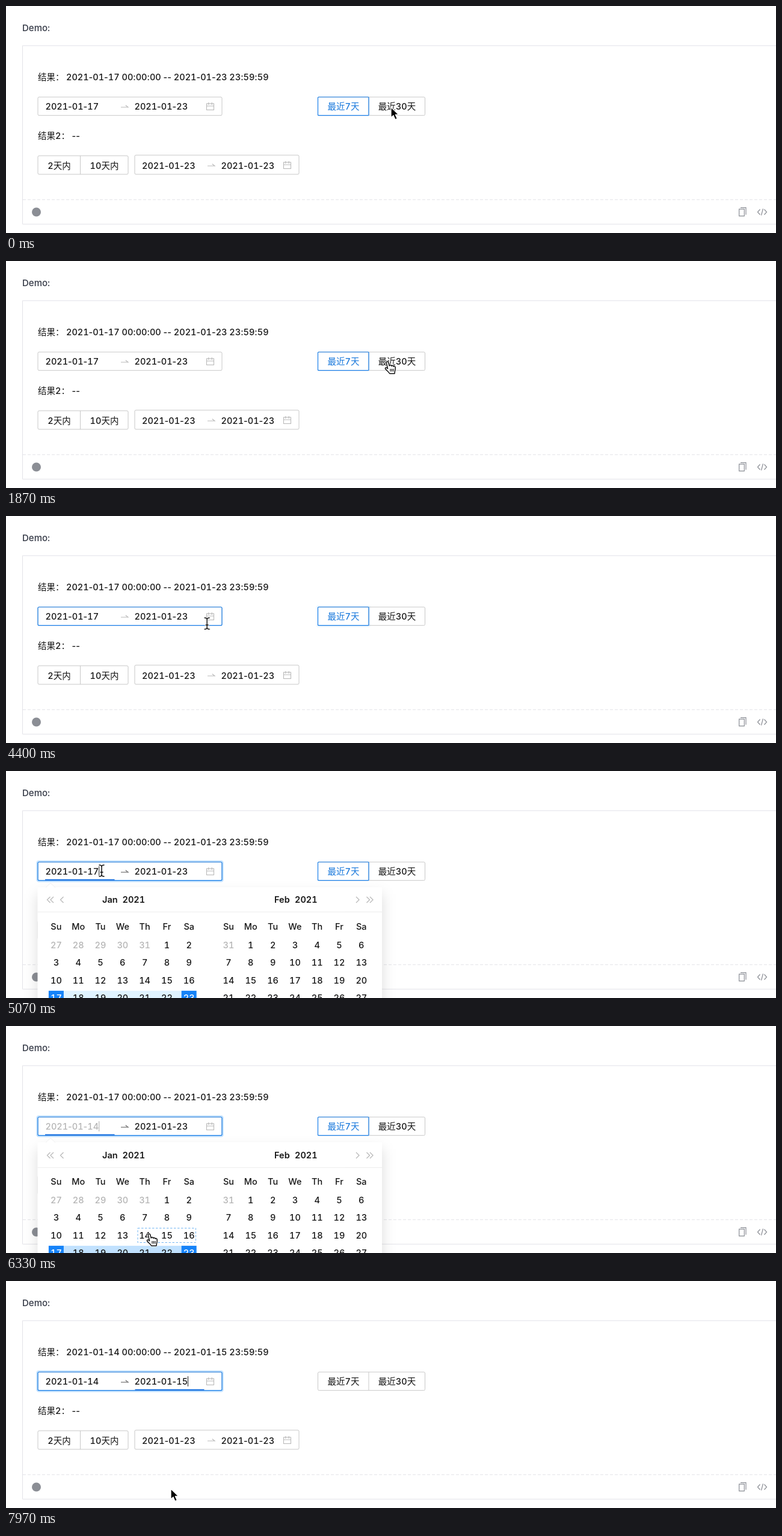
Recreate the animation shown at these times as an HTML page. Size 1280 px wide and 379 px high, loop 8000 ms.

```html
<!DOCTYPE html>
<html lang="zh-CN">
<head>
<meta charset="utf-8">
<title>Date range demo</title>
<style>
html, body { margin: 0; width: 100%; height: 100%; overflow: hidden; background: #fff; }
svg { display: block; width: 100vw; height: 100vh; }
text { font: 450 14.5px Inter, "Noto Sans CJK SC", sans-serif; font-feature-settings: "tnum"; fill: #161616; }
.sep { font-feature-settings: normal; }
.mid text, text.mid { text-anchor: middle; }
.dim, .dim text { fill: #b5b5b5; }
.bold { font-weight: 600; }
.title { font-size: 15px; fill: #343946; }
.box { fill: #fff; stroke: #c8c8c8; }
.line { fill: none; stroke: #e3e3e8; }
.icon { fill: none; stroke: #b9b9b9; stroke-width: 1.1; }
.tool { fill: none; stroke: #8b8e95; stroke-width: 1.2; }
.pick { fill: none; stroke: #1a80ea; stroke-width: 1.2; }
.glow { fill: none; stroke: #1890ff; stroke-opacity: .06; stroke-width: 3; }
.full { fill: #1683f8; }
.light { fill: #e0f3ff; }
.dark { fill: #c1e1fe; }
.off { fill: #f3f3f3; }
.bar { fill: #1f74e0; }

.cur { animation: move 8s linear infinite; }
.drop { transform-origin: 0 194px; animation: drop 8s linear infinite; }
.head { animation: head 8s step-end infinite; }
.week { animation: week 8s linear infinite; }
.month { animation: month 8s linear infinite; }
.past { animation: past 8s step-end infinite; }
.d14 { animation: d14 8s step-end infinite; }
.d15 { animation: d15 8s step-end infinite; }
.d17 { animation: d17 8s step-end infinite; }
.d23 { fill: #fff; }

@keyframes move {
  0%, .3% { transform: translate(640px, 169px); animation-timing-function: ease-in-out; }
  2.9%, 5.3% { transform: translate(509px, 184px); animation-timing-function: ease-in-out; }
  10.4%, 12.1% { transform: translate(619px, 168px); animation-timing-function: ease-in-out; }
  17.1%, 23.5% { transform: translate(634px, 168px); animation-timing-function: ease-in-out; }
  27.9%, 33.5% { transform: translate(646px, 171px); animation-timing-function: ease-in-out; }
  39.6%, 50.3% { transform: translate(561px, 166px); animation-timing-function: ease-in; }
  52.2% { transform: translate(515px, 180px); }
  53.6% { transform: translate(425px, 187px); }
  55% { transform: translate(335px, 180px); animation-timing-function: ease-out; }
  59.6%, 71.2% { transform: translate(159px, 167px); animation-timing-function: ease-in-out; }
  76.6%, 78.3% { transform: translate(240px, 372px); }
  79.1%, 85.5% { transform: translate(238px, 347px); animation-timing-function: ease-in-out; }
  89.6%, 100% { transform: translate(274px, 347px); }
}
@keyframes drop {
  0%, 60.9% { opacity: 0; transform: scaleY(.8); animation-timing-function: cubic-bezier(.23, 1, .32, 1); }
  63.3%, 93.5% { opacity: 1; transform: none; animation-timing-function: cubic-bezier(.755, .05, .855, .06); }
  95.9%, 100% { opacity: 0; transform: scaleY(.8); }
}
@keyframes head { 0% { transform: translateY(-1px); } 64%, 100% { transform: none; } }
@keyframes week {
  0%, 30% { fill: #1878dc; } 33.7%, 37.5% { fill: #161616; }
  41%, 84.3% { fill: #1878dc; } 88%, 100% { fill: #161616; }
}
@keyframes month {
  0%, 23.5% { fill: #161616; } 27.5%, 42.7% { fill: #1878dc; } 46.5%, 100% { fill: #161616; }
}
@keyframes past { 0% { fill: #161616; } 84.4%, 100% { fill: #b0b0b0; } }
@keyframes d14 { 0% { fill: #161616; } 84.4%, 100% { fill: #fff; } }
@keyframes d15 { 0% { fill: #161616; } 92.9%, 100% { fill: #fff; } }
@keyframes d17 { 0% { fill: #fff; } 84.4%, 100% { fill: #161616; } }
</style>
</head>
<body>
<svg viewBox="0 0 1280 379">
  <defs>
    <filter id="soft" x="-20%" y="-20%" width="140%" height="140%"><feGaussianBlur stdDeviation="11"/></filter>
    <g id="cal"><rect x=".5" y="2" width="12" height="10.5"/><path d="M.5 6H12.5M3.8 0V4M9.2 0V4"/></g>
    <path id="to" d="M0 0H12L7.8-3.3"/>
    <path id="beam" d="M-4-10Q0-10 0-7Q0-10 4-10M0-7V6M-4 9Q0 9 0 6Q0 9 4 9M-2 2H2"/>
    <path id="hand" d="M-1.8 1.5C-1.8-.6 1.4-.6 1.8 1.5L3.2 7C3.6 5.4 6.4 5.2 6.8 7.4C7.4 6 9.6 6.2 10 8.2C11 7 13 7.6 13.2 9.6C13.4 12.5 13.4 14 12.4 16.500L12 20H3.800C2.600 17.500 .2 15.800-2.800 12.900C-4.600 11-3 9.200-1 10.400L.6 11.800Z"/>
  </defs>

  <text class="title" x="27" y="42">Demo:</text>
  <path class="line" d="M1280 66.2H27.5V364.2H1280"/>
  <path class="line" d="M28 323.3H1280" stroke-dasharray="5 3"/>
  <circle cx="50.5" cy="344" r="7.5" fill="#8b8e95"/>
  <g class="tool">
    <path d="M1218.7 339.2H1227.3V350.7H1218.7ZM1221 336.7H1230V348.5"/>
    <path d="M1253.5 339.5L1249.5 344L1253.5 348.5M1260.5 339.5L1264.5 344L1260.5 348.5M1258.5 338.5L1255.5 349.5"/>
  </g>

  <text x="53" y="124">结果：</text>
  <g id="result"></g>

  <rect class="box" x="53" y="152" width="306" height="30.7" rx="2"/>
  <rect class="pick" x="53" y="152" width="306" height="30.7" rx="2" data-on="4390 4880"/>
  <g data-on="4880 8000">
    <rect x="51.5" y="150.5" width="309" height="33.7" rx="3" fill="none" stroke="#1890ff" stroke-opacity=".25" stroke-width="2.5"/>
    <rect class="pick" x="53" y="152" width="306" height="30.7" rx="2"/>
  </g>
  <use href="#to" class="icon" x="191" y="169"/>
  <use href="#to" class="icon" x="191" y="169" style="stroke:#777" data-on="4880 8000"/>
  <use href="#cal" class="icon" x="333" y="161"/>

  <rect class="box" x="214" y="249" width="273" height="32" rx="2"/>
  <use href="#to" class="icon" x="335" y="267"/>
  <use href="#cal" class="icon" x="461" y="259"/>
  <g id="fields"></g>
  <rect class="bar" x="65" y="180.7" width="115.5" height="2.2" data-on="4880 6750"/>
  <rect class="bar" x="214.5" y="180.7" width="115" height="2.2" data-on="6750 8000"/>
  <path d="M154.7 159V176" stroke="#222" data-on="4880 5380"/>
  <path d="M154.7 159V176" stroke="#aaa" data-on="5950 6450"/>
  <path d="M302.5 159V176" stroke="#222" data-on="6750 7050 7965 8000"/>
  <path d="M302.5 159V176" stroke="#aaa" data-on="7050 7500"/>

  <rect class="box" x="518.5" y="152" width="178" height="30.7" rx="2"/>
  <path d="M603 152V182.7" stroke="#c8c8c8"/>
  <rect class="glow" x="517" y="150.5" width="87.5" height="33.7" rx="2" data-on="3420 4880"/>
  <rect class="pick" x="518.5" y="152" width="84.5" height="30.7" rx="1" data-on="0 2400 3420 6750"/>
  <g data-on="2400 3420">
    <rect class="glow" x="601" y="150.5" width="97" height="33.7" rx="2"/>
    <rect class="pick" x="602.5" y="152" width="94" height="30.7" rx="1"/>
  </g>
  <text class="week mid" x="561" y="173">最近7天</text>
  <text class="month mid" x="650" y="173">最近30天</text>

  <text x="53" y="221.5">结果2：</text>
  <text class="sep" x="109.5" y="221.5">--</text>
  <rect class="box" x="53" y="250" width="150" height="31" rx="2"/>
  <path d="M123.5 250V281" stroke="#c8c8c8"/>
  <g class="mid"><text x="88.5" y="271.5">2天内</text><text x="163.5" y="271.5">10天内</text></g>

  <g class="drop">
    <rect x="52" y="205" width="574" height="300" fill="#000" fill-opacity=".13" filter="url(#soft)"/>
    <rect x="52.5" y="194" width="572.5" height="300" rx="2" fill="#fff"/>
    <path d="M66 194.5L74 187L82 194.5" fill="#fff" stroke="#eee" data-on="0 6750"/>
    <path d="M215 194.5L223 187L231 194.5" fill="#fff" stroke="#eee" data-on="6750 8000"/>
    <g class="head">
      <path class="icon" style="stroke-width:1.3" d="M73.5 211L68.5 216L73.5 221M79 211L74 216L79 221M95.5 211L90.5 216L95.5 221M582 211L587 216L582 221M599.5 211L604.5 216L599.5 221M605 211L610 216L605 221"/>
      <text class="bold" x="160" y="220.5">Jan</text><text class="bold" x="193.5" y="220.5">2021</text>
      <text class="bold" x="446" y="220.5">Feb</text><text class="bold" x="480" y="220.5">2021</text>
      <path d="M52.5 236.3H625" stroke="#ececec"/>
    </g>
    <g id="marks"></g>
    <g id="days" class="mid"></g>
  </g>

  <g class="cur">
    <g data-on="0 470 4170 4370 5735 5915 7435 8000">
      <path d="M0 0V17.3L4 13.7L6.9 20.5L10.3 19L7.4 12.4H12.6Z" fill="#000" stroke="#fff" stroke-width="1.3" stroke-linejoin="round"/>
    </g>
    <g data-on="470 4170 5915 7435" stroke-linejoin="round">
      <use href="#hand" fill="#fff" stroke="#fff" stroke-width="3"/>
      <use href="#hand" fill="#fff" stroke="#111" stroke-width="1.5"/>
      <path d="M5 12V16.5M7.500 12V16.500M10 12V16.500" stroke="#111" stroke-width="1.2"/>
    </g>
    <g data-on="4370 5735" fill="none" stroke-linecap="round">
      <use href="#beam" stroke="#fff" stroke-width="3.2"/>
      <use href="#beam" stroke="#111" stroke-width="1.5"/>
    </g>
  </g>
</svg>
<script>
const LOOP = 8000, STEP = 36.8;
const put = (id, html) => document.getElementById(id).innerHTML += html;
// Digits are tabular, separators keep their natural width
const spaced = str => String(str).replace(/[-: ]+/g, '<tspan class="sep">$&</tspan>');
const label = (x, y, str, cls = '', on = '') =>
  `<text x="${x}" y="${y}" class="${cls}"${on && ` data-on="${on}"`}>${spaced(str)}</text>`;
const group = (on, html) => `<g data-on="${on}">${html}</g>`;

const result = (from, to, on) =>
  put('result', label(100, 124, `${from} 00:00:00 -- ${to} 23:59:59`, '', on));
result('2021-01-17', '2021-01-23', '0 2400 3420 6750');
result('2020-12-25', '2021-01-23', '2400 3420');
result('2021-01-14', '2021-01-23', '6750 7430');
result('2021-01-14', '2021-01-15', '7430 8000');

const field = (x, date, on, cls) => put('fields', label(x, 173, date, cls, on));
field(65.5, '2021-01-17', '0 2400 3420 5950');
field(65.5, '2020-12-25', '2400 3420');
field(65.5, '2021-01-14', '5950 6040 6300 6750', 'dim');
field(65.5, '2021-01-21', '6040 6300', 'dim');
field(65.5, '2021-01-14', '6750 8000');
field(213.5, '2021-01-23', '0 7050');
field(213.5, '2021-01-15', '7050 7640', 'dim');
field(213.5, '2021-01-15', '7640 8000');
put('fields', label(226, 271.5, '2021-01-23') + label(357.5, 271.5, '2021-01-23'));

// Day marks: columns and rows of the January grid
const rect = (x, row, w, cls) =>
  `<rect class="${cls}" x="${x}" y="${278.4 + 29.5 * row}" width="${w}" height="24.5"/>`;
const span = (a, b, row, cls) => rect(65 + STEP * a, row, STEP * (b - a), cls);
const full = (col, row) => rect(70.9 + STEP * col, row, 25, 'full');
const ends = full(0, 3) + full(6, 3);
const past = span(0, 7, 0, 'off') + span(0, 7, 1, 'off') + span(0, 4, 2, 'off') + full(4, 2);
const dashes = '<rect x="219" y="337.5" width="96.5" height="24" fill="none" stroke="#74b6f2" stroke-dasharray="3.5 2.5"/>';
put('marks',
  group('0 5950', span(.5, 6.5, 3, 'light') + ends) +
  group('5950 6040 6300 6750', dashes + span(.5, 6.5, 3, 'dark') + ends) +
  group('6040 6300', span(.5, 4, 3, 'light') + span(4, 6.5, 3, 'dark') + ends) +
  group('6750 7430', span(4.5, 7, 2, 'light') + span(0, 6.5, 3, 'light') + past + full(6, 3)) +
  group('7050 7430', span(5, 6, 2, 'dark')) +
  group('7430 8000', span(5, 5.5, 2, 'light') + past + full(6, 3)));

const janClass = n => n < 14 ? 'past' : [14, 15, 17, 23].includes(n) ? 'd' + n : '';
const month = (left, lead, prev, styleOf) => {
  ['Su', 'Mo', 'Tu', 'We', 'Th', 'Fr', 'Sa'].forEach((d, i) => put('days', label(left + STEP * i, 265, d)));
  for (let i = 0; i < 28; i++) {
    const n = i - lead + 1, old = n < 1;
    put('days', label(left + STEP * (i % 7), 295.8 + 29.5 * Math.floor(i / 7),
      old ? prev + n : n, old ? 'dim' : styleOf(n)));
  }
};
month(83.4, 5, 31, janClass);
month(370, 1, 31, () => '');

// data-on lists "from to" pairs in ms; each becomes a stepped keyframe rule
const rules = new Map();
document.querySelectorAll('[data-on]').forEach(el => {
  const on = el.dataset.on;
  if (!rules.has(on)) rules.set(on, 'on' + rules.size);
  el.style.animation = `${rules.get(on)} ${LOOP}ms step-end infinite`;
});
const sheet = document.createElement('style');
sheet.textContent = [...rules].map(([on, name]) => {
  const keys = on.split(' ').map((t, i) => `${t * 100 / LOOP}% { opacity: ${1 - i % 2}; }`);
  const start = on.startsWith('0 ') ? '' : '0% { opacity: 0; }';
  return `@keyframes ${name} { ${start} ${keys.join(' ')} 100% { opacity: 0; } }`;
}).join('\n');
document.head.append(sheet);
</script>
</body>
</html>
```
